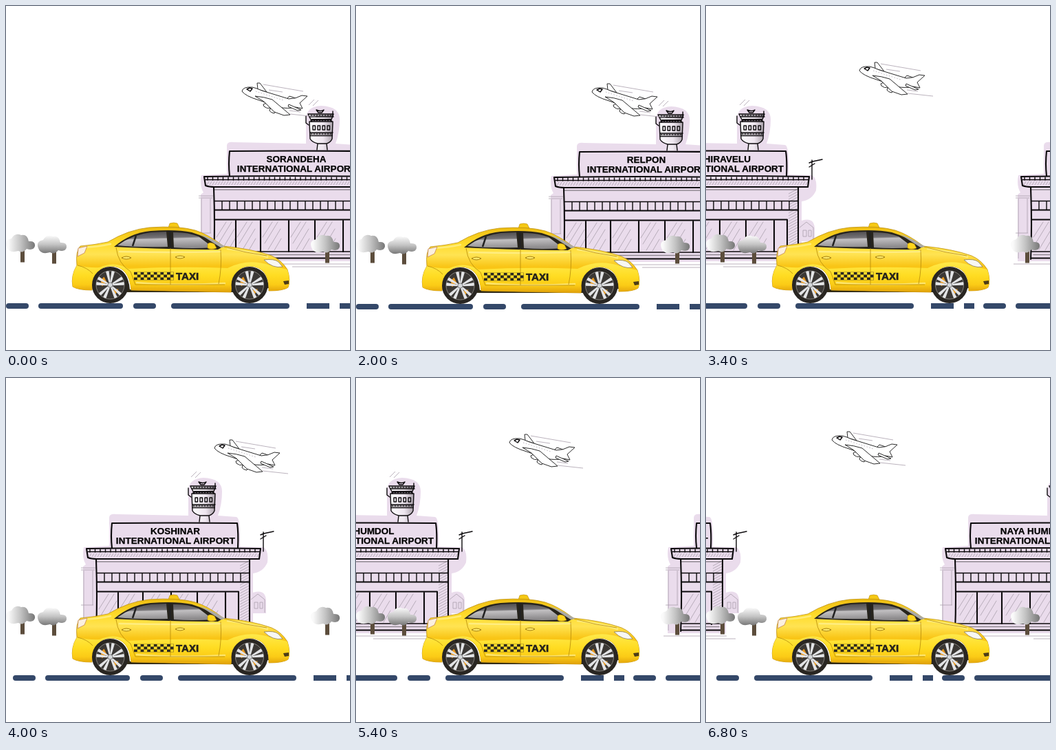
Animation of 500 by 500 pixels, one loop 7000 ms. Source, as an HTML page:

```html
<!DOCTYPE html>
<html>
<head>
<meta charset="utf-8">
<style>
html, body { margin: 0; width: 100%; height: 100%; overflow: hidden; background: #fff; }
svg { display: block; width: 500px; height: 500px; }
text { font-family: "Liberation Sans", Arial, sans-serif; font-weight: bold; }
.ink { fill: none; stroke: #0c0a0c; stroke-width: 1.4; stroke-linejoin: round; stroke-linecap: round; }
.bold { stroke-width: 2.1; }
.pale { fill: none; stroke: #aaa0ad; stroke-width: .8; }
.white { fill: #fff; stroke: #2a2a2a; stroke-width: 1; stroke-linejoin: round; }
</style>
</head>
<body>
<svg viewBox="0 0 500 500">
<defs>
  <linearGradient id="leaf"><stop offset=".08" stop-color="#fafafa"/><stop offset=".5" stop-color="#c4c4c4"/><stop offset="1" stop-color="#777"/></linearGradient>
  <linearGradient id="leafDown" x2="0" y2="1"><stop offset="0" stop-color="#fafafa"/><stop offset=".5" stop-color="#c4c4c4"/><stop offset="1" stop-color="#777"/></linearGradient>
  <linearGradient id="paint" x2="0" y2="1"><stop offset="0" stop-color="#eebd12"/><stop offset=".25" stop-color="#ffdc2c"/><stop offset=".42" stop-color="#ffe352"/><stop offset=".6" stop-color="#f9c516"/></linearGradient>
  <linearGradient id="lower" x2="0" y2="1"><stop offset="0" stop-color="#ffe94a"/><stop offset=".45" stop-color="#ffdc22"/><stop offset=".75" stop-color="#fbcb16"/><stop offset="1" stop-color="#e0a00a"/></linearGradient>
  <linearGradient id="glass" x2=".15" y2="1"><stop offset="0" stop-color="#4a484a"/><stop offset=".42" stop-color="#757376"/><stop offset=".5" stop-color="#c2c0c2"/><stop offset="1" stop-color="#8d8b8d"/></linearGradient>
  <linearGradient id="tube"><stop offset="0" stop-color="#fff"/><stop offset=".6" stop-color="#eee6ef"/><stop offset="1" stop-color="#a59ca6"/></linearGradient>
  <pattern id="check" x="186" y="386.5" width="9.6" height="8" patternUnits="userSpaceOnUse"><path d="M0 0h4.8v4H0zM4.8 4h4.8v4H4.8z" fill="#292720"/></pattern>

  <g id="tree">
    <path d="M0 11h6v17.5h-6z" fill="#5c4d3c"/>
    <path d="M-20 6Q-24-4-13-6Q-8-15 1-11Q10-13 12-2Q22-3 21 5Q19 12 9 9Q3 16-3 12Q-17 16-20 6Z"/>
  </g>

  <g id="wheel">
    <circle r="26.5" fill="#292622"/>
    <circle r="20.5" fill="#3b3835" stroke="#85827e" stroke-width="1"/>
    <path d="M-14-7l5-5 4 8-7 6zM6 6l6 0-4 7-4-3z" fill="#e9981c"/>
    <g id="spokes"></g>
    <circle r="3.6" fill="#d5d7da" stroke="#555" stroke-width=".7"/>
  </g>

  <g id="airport">
    <path fill="#eadcec" d="M283 371V274L287 271Q281 261 284 246L321 244V203Q321 197 331 198L436 200V165Q436 146 458 145Q485 146 485 165Q485 184 479 200L506 202Q512 203 511 245L545 246Q553 250 551 268Q545 282 530 284V312Q549 306 549 325V342H530V371Z"/>
    <path class="pale" d="M280 276h21M280 279h20M284 280v87M297 280v50M280 330h18M527 322l10-8 10 8v19M532 326h5v9h-5zM540 326h4v9h-4zM277 375h254M416 379h128"/>
    <path id="glare" class="pale" stroke-linecap="round"/>
    <path id="hatch" class="pale"/>
    <path class="ink bold" d="M325 247Q323 230 325 211Q420 210 507 211Q509 225 508 247M288 248Q415 246 541 248M288 248L290 261Q295 263 303 263H539L541 248M302 264Q304 318 302 368M525 264V368M303 296.5H525M303 310.5H509V358M302 366.5H526"/>
    <path class="ink" d="M290 252.5H540M303 283.5H525M303 357H525M545 224V252M541 234l8-5M541 228l5-2 14-3"/>
    <path class="ink bold" d="M334 312V357M370 312V357M411 312V357M449 312V357M490 312V357"/>
    <path class="ink" d="M303 267H523M306 361.5H520" stroke-opacity=".4"/>
    <path id="ticks" class="ink"/>
    <path class="ink" fill="url(#tube)" style="fill:url(#tube)" d="M452 209L453 200H466L467 209M441 168H475L474 193Q472 198 466 200H453Q445 198 442 193ZM439 157H476L473 165H443Z"/>
    <path class="ink" d="M442 184H475M442 188.5H474M441 161H476M444 168l1-3h27l1 3M436 160v10l4 3M475 153v7M451 151q6 3 11 0l-3 4h-5z"/>
    <path class="ink" stroke-dasharray="2 2" d="M443 159H474M443 186H474M443 166.500H474"/>
    <path class="ink" d="M446 174h3.500v6H446zM453 174h3.500v6H453zM460 174h3.500v6H460zM467 174h3.500v6H467z" stroke-width="1"/>
    <path class="pale" d="M440 144l8-8M446 145l8-8"/>
    <g id="label" text-anchor="middle" font-size="13.4" letter-spacing=".08" stroke="#000" stroke-width=".25">
      <text id="city" x="422" y="227"></text>
      <text x="422.5" y="241">INTERNATIONAL AIRPORT</text>
    </g>
  </g>

  <g id="dashes" fill="#344869"></g>
</defs>

<g id="stage">
  <use id="leaving" href="#airport"/>
  <use id="coming" href="#airport"/>
  <g id="plane">
    <path class="pale" d="M374 114l58 10M382 122l20 3M413 157l37 4M412 152l16 2"/>
    <path class="white" d="M366 121L365 112H369L379 125ZM409 134L412 131L424 135"/>
    <path class="white" d="M343 124Q344 117 358 118Q363 119 372 123L411 135Q421 135 430 130L438 131L427 141L431 149L421 147Q411 150 396 147L368 137Q348 131 343 124Z"/>
    <path class="white" d="M374 143q4-3 9 1l2 4q-6 2-10-2zM384 149q5-1 8 3l-2 4q-6-1-7-4z"/>
    <path class="white" d="M362 131Q375 132 387 136L413 158L404 159L390 154L375 139ZM411 143L429 151L424 152L410 146Z"/>
    <path class="ink" d="M350 121l4-2 4 1-3 4z" stroke-width=".9"/>
    <path class="pale" d="M363 124l40 13" stroke-dasharray="1.500 2.500"/>
  </g>
  <use href="#tree" x="21" y="344" fill="url(#leaf)"/>
  <use href="#tree" x="67" y="346" fill="url(#leafDown)"/>
  <use href="#tree" x="464" y="345" fill="url(#leaf)"/>
  <g id="road"><use href="#dashes" x="-513"/><use href="#dashes"/><use href="#dashes" x="513"/></g>

  <g id="car">
    <path d="M126 404Q128 380 152 380Q177 380 180 412H326Q328 380 354 380Q380 380 382 410L330 416H180L130 415Z" fill="#302a18"/>
    <path d="M236 322L238 316Q244 314 249 316L252 322Z" fill="#f5c814" stroke="#b98c0c" stroke-width=".6"/>
    <path id="body" d="M97 408Q94 392 103 377Q101 356 108 349Q130 347 148 343Q178 325 208 322Q250 319 275 326Q294 332 316 349Q358 353 386 363Q400 369 409 383Q414 399 410 409Q403 414 382 414Q383 379 354 378Q329 379 327 416L182 413Q179 378 152 378Q127 379 125 413Q105 413 97 408Z" fill="url(#paint)" stroke="#bd900e" stroke-width=".8"/>
    <path d="M97 408Q94 392 103 377Q122 381 136 380Q158 370 178 382Q250 378 322 381Q352 366 384 377L409 383Q414 399 410 409Q403 414 382 414Q383 379 354 378Q329 379 327 416L182 413Q179 378 152 378Q127 379 125 413Q105 413 97 408Z" fill="url(#lower)"/>
    <path d="M112 351Q135 350 152 346M165 357Q240 359 312 357M322 353Q356 357 380 365M190 402Q250 407 318 403" fill="none" stroke="#fff6a6" stroke-width="2.500" stroke-linecap="round" opacity=".6"/>
    <path d="M157 350Q180 330 210 327Q247 324 270 329Q290 335 315 350L308 354Q240 354 157 350Z" fill="#27241d"/>
    <path d="M162 348Q184 332 211 329L233 328L235 350Q190 351 162 348ZM243 329Q262 328 280 335L301 351Q270 353 244 351Z" fill="url(#glass)"/>
    <path d="M189 334l-5 15M238 327l1 25" stroke="#222" stroke-width="2.500"/>
    <path d="M281 331Q300 338 319 350L312 351Q296 341 281 331Z" fill="#aaa9a4"/>
    <path d="M293 346Q296 342 303 346L306 352Q298 355 293 352Z" fill="#ffd51b" stroke="#ae830c" stroke-width=".6"/>
    <path d="M160 351Q163 375 181 386L188 405H318M239 352V405M312 354Q314 380 309 404M317 350Q348 359 379 363M104 377Q118 380 126 389" fill="none" stroke="#b58a0a" stroke-width=".8"/>
    <path d="M168 366q7-4 14 0-7 4-14 0M246 365q7-4 14 0-7 4-14 0" fill="#ffe968" stroke="#9a760b" stroke-width=".9"/>
    <path d="M105 352L118 349L114 359L104 364Z" fill="#fbf0df" stroke="#bd7a4b" stroke-width=".7"/>
    <path d="M375 369Q390 367 396 372L402 379Q388 382 375 369Z" fill="#f7f7f2" stroke="#897e5c" stroke-width=".8"/>
    <path d="M403 400l8-1v5l-6 1z" fill="#4b3b18"/>
    <path d="M186 386.5h58v12h-58z" fill="url(#check)"/>
    <text x="247" y="398" font-size="15" fill="#25231c" stroke="#25231c" stroke-width=".6">TAXI</text>
    <use href="#wheel" x="151.500" y="405.500"/>
    <use href="#wheel" x="354" y="405.500"/>
  </g>
</g>
</svg>
<script>
const $ = id => document.getElementById(id);
const repeat = (from, to, step, make) => {
  let out = "";
  for (let x = from; x <= to; x += step) out += make(x);
  return out;
};
const move = (id, x, y = 0) => $(id).setAttribute("transform", `translate(${x} ${y})`);

$("ticks").setAttribute("d",
  repeat(293, 538, 7.5, x => `M${x} 249v4`) + repeat(314, 520, 11, x => `M${x} 284v12`));
$("glare").setAttribute("d", [306, 336, 373, 414, 452].map(x =>
  `M${x} 336l14-22M${x + 3} 345l19-31M${x + 8} 354l18-30M${x + 17} 355l10-17`).join(""));
$("hatch").setAttribute("d",
  repeat(292, 536, 4, x => `M${x} 260l3-5`) + repeat(268, 354, 4, y => `M511 ${y + 5}l13-7`));
$("spokes").innerHTML = repeat(0, 288, 72, a => [a - 12, a + 12].map(b =>
  `<path d="M-1-3L-2.3-20Q0-21 2.3-20L1-3Z" fill="#e3e4e6" transform="rotate(${b})"/>`).join(""));

// start, end, corner radius
$("dashes").innerHTML = [[0, 33, 4], [47, 170, 4], [185, 218, 4], [240, 412, 4], [437, 470, 0], [485, 500, 0]]
  .map(([a, b, r]) => `<rect x="${a}" y="432" width="${b - a}" height="8" rx="${r}"/>`).join("");

const scenes = [
  [0, "SORANDEHA"], [1000, "BELUNTI"], [2000, "RELPON"], [2800, "DHIRAVELU"],
  [3800, "KOSHINAR"], [4800, "HUMDOL"], [6000, "NAYA HUMDOL"]
];
const SPACING = 561, STEP = 200, LOOP = 7000;

function draw(time) {
  const t = time % LOOP;
  const [start, name] = scenes.findLast(s => s[0] <= t);
  const step = Math.min(4, Math.floor((t - start) / STEP));
  const rest = step === 0;
  const x = rest ? 0 : -61 - 110 * step;

  $("city").textContent = name;
  move("label", rest ? 0 : -5);
  move("leaving", x);
  move("coming", x + SPACING);
  move("road", rest ? 0 : 70 - 60 * step);
  move("plane", -40 * step, rest ? 0 : -18 - 4 * step);
  move("stage", 0, rest && start ? 1 : 0);
}

const begin = performance.now();
function tick() {
  draw(performance.now() - begin);
  requestAnimationFrame(tick);
}
tick();
</script>
</body>
</html>
```
